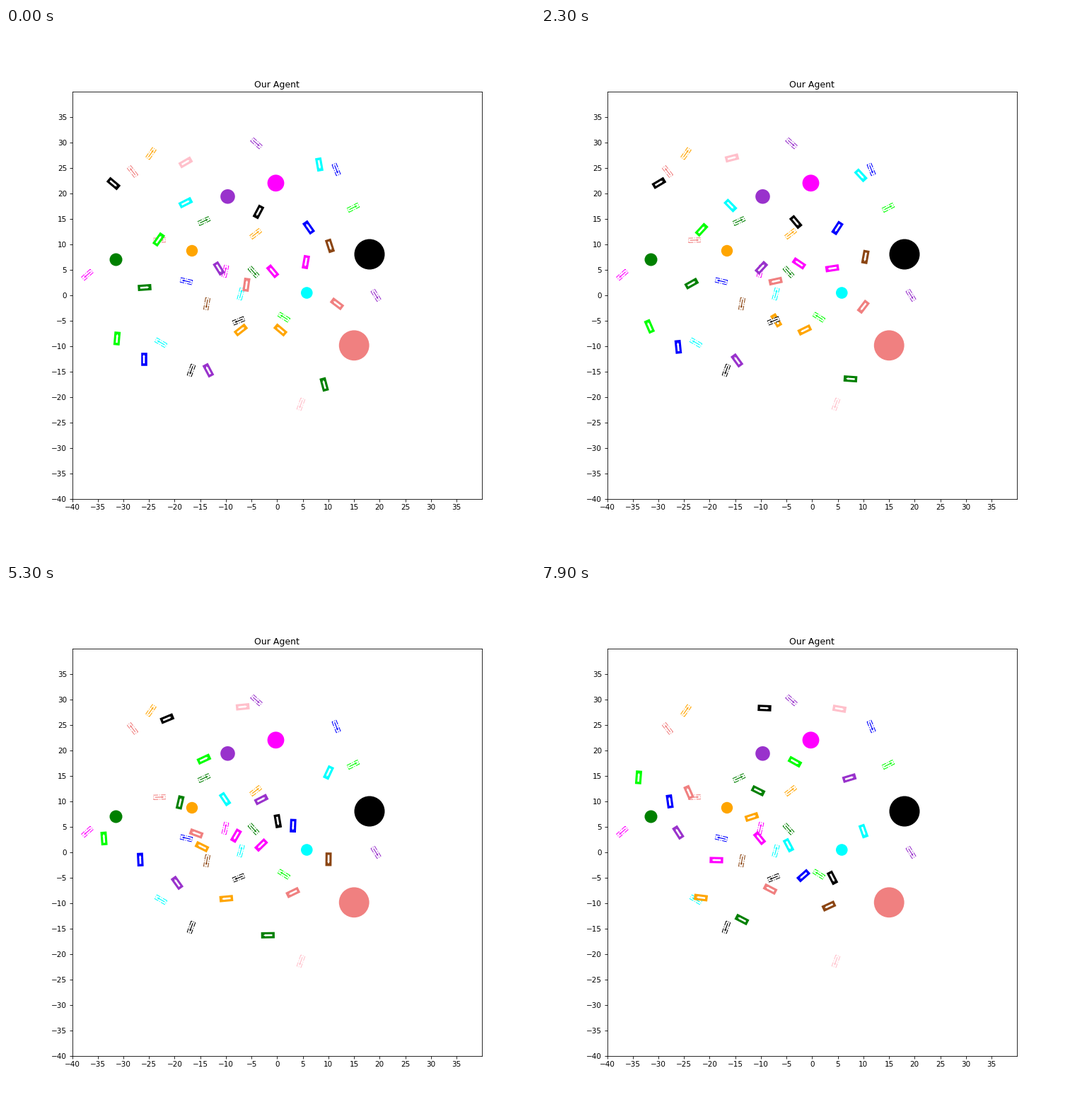
These frames come from a looping animation (748 px wide and 748 px high, 8000 ms). A matplotlib script:

```python
import numpy as np
import matplotlib.pyplot as plt
from matplotlib.animation import FuncAnimation
from matplotlib.patches import Circle, Polygon

SIZE = 748
STEPS = 79
LENGTH, WIDTH = 16.6, 6.2  # vehicle outline in pixels


def travelled(step):
    """Pixels driven since the start; all vehicles share this speed-up."""
    return 0.068 * step ** 1.8


MARKS = travelled(np.array([0, 34, 62, 78]))  # distance at each key point


def arrow_shape(shaft, head):
    return np.array([(-6.2, -shaft), (3, -shaft), (3, -head), (6.4, 0),
                     (3, head), (3, shaft), (-6.2, shaft)])


BODY = np.array([(-1, -1), (1, -1), (1, 1), (-1, 1)]) * (LENGTH / 2, WIDTH / 2)
CAR_ARROW = arrow_shape(1.3, 1.8)
GOAL_ARROW = arrow_shape(0.6, 1.6)

fig, ax = plt.subplots(figsize=(10, 10), dpi=SIZE / 10)
ax.set(xlim=(-40, 40), ylim=(-40, 40), title="Our Agent",
       xticks=np.arange(-40, 40, 5), yticks=np.arange(-40, 40, 5))

# Pixel-sized layer with y pointing down
layer = fig.add_axes([0, 0, 1, 1])
layer.set(xlim=(0, SIZE), ylim=(SIZE, 0))
layer.axis("off")


def place(shape, x, y, angle):
    c, s = np.cos(angle), np.sin(angle)
    px, py = shape.T
    return np.column_stack([x + c * px - s * py, y - s * px - c * py])


def add_poly(shape, **style):
    return layer.add_patch(Polygon(shape, closed=True, **style))


def disc(color, x, y, r):
    layer.add_patch(Circle((x, y), r, fc=color, lw=0, zorder=5))


def goal(color, x, y, deg):
    pose = x, y, np.radians(deg)
    z = 4 if color == "black" else 2
    add_poly(place(BODY, *pose), fc="white", ec=color, lw=1, ls="-.", zorder=z)
    add_poly(place(GOAL_ARROW, *pose), fc=color, lw=0, zorder=z)


class Car:
    """Drives a smooth curve through key points, nose along the curve."""

    def __init__(self, color, deg, *points):
        a = np.radians(deg)
        self.pts = np.array(points, float)
        self.slope = np.gradient(self.pts, MARKS, axis=0, edge_order=2)
        self.slope[0] = np.cos(a), -np.sin(a)
        self.body = add_poly(BODY, fc=color, ec=color, lw=2.5, zorder=3)
        self.arrow = add_poly(CAR_ARROW, fc="white", lw=0, zorder=3)

    def at(self, s):
        i = np.clip(np.searchsorted(MARKS, s) - 1, 0, len(MARKS) - 2)
        span = MARKS[i + 1] - MARKS[i]
        u = (s - MARKS[i]) / span
        w = u * u * (3 - 2 * u)
        return ((1 - w) * self.pts[i] + w * self.pts[i + 1]
                + span * u * (1 - u) * ((1 - u) * self.slope[i]
                                        - u * self.slope[i + 1]))

    def move(self, s):
        x, y = self.at(s)
        dx, dy = self.at(s + 0.2) - self.at(s - 0.2)
        pose = x, y, np.arctan2(-dy, dx)
        self.body.set_xy(place(BODY, *pose))
        self.arrow.set_xy(place(CAR_ARROW, *pose))


disc("green", 155.5, 327.5, 9)
disc("orange", 263, 315, 8.2)
disc("darkorchid", 313.5, 238.3, 10.3)
disc("magenta", 381.5, 219.3, 11.9)
disc("black", 514, 320, 21.5)
disc("lightcoral", 492.2, 448.8, 21.4)
disc("cyan", 425.3, 374.5, 8.3)

goal("pink", 417, 532, 250)
goal("cyan", 332, 376, 75)
goal("cyan", 219, 445, 150)
goal("blue", 467, 200, -68)
goal("blue", 255, 358, 167)
goal("saddlebrown", 284, 390, 260)
goal("magenta", 115, 349, 222)
goal("magenta", 310, 344, 77)
goal("lightcoral", 179, 203, 128)
goal("lightcoral", 217, 300, 2)
goal("orange", 205, 177.5, 55)
goal("orange", 353, 291, 38)
goal("darkorchid", 354, 163, -42)
goal("darkorchid", 523, 378, -58)
goal("lime", 491, 254, 27)
goal("lime", 393, 409, 148)
goal("green", 280, 273, 25)
goal("green", 350, 345, -48)
goal("black", 329, 414, 202)
goal("black", 262, 484, 250)

cars = [
    Car("pink", 30, (254, 190), (290, 179.5), (366, 170.5), (422, 175)),
    Car("cyan", 27, (254, 247), (282, 268), (326, 328), (350, 368)),
    Car("cyan", -80, (443, 193), (465, 225), (447, 294), (456, 348)),
    Car("blue", 125, (428, 282), (411, 300), (401, 370), (371, 411)),
    Car("blue", 90, (195, 468), (192, 431), (188, 359), (182, 306)),
    Car("saddlebrown", -72, (458, 308), (455, 342), (450, 417), (407, 454)),
    Car("magenta", 260, (424, 331), (390, 343), (343, 378), (309, 358)),
    Car("magenta", 130, (377, 344), (350, 327), (305, 378), (248, 389)),
]
cars += [
    Car("lightcoral", 82, (340, 363), (311, 362), (242, 337), (209, 293)),
    Car("lightcoral", 143, (468, 390), (442, 412), (378, 443), (324, 430)),
    Car("orange", 38, (332, 427), (319, 396), (259, 355), (298, 328)),
    Car("orange", 140, (388, 427), (353, 437), (282, 445), (226, 442)),
    Car("darkorchid", -58, (301, 340), (326, 323), (387, 291), (436, 273)),
    Car("darkorchid", 118, (286, 484), (266, 455), (225, 397), (194, 350)),
]
cars += [
    Car("lime", 55, (216, 299), (242, 271), (308, 238), (359, 250)),
    Car("lime", 85, (157, 439), (145, 402), (137, 328), (138, 272)),
    Car("green", 4, (196, 367), (230, 349), (258, 285), (307, 291)),
    Car("green", 105, (450, 504), (415, 496), (339, 493), (284, 473)),
    Car("black", -40, (152, 220), (186, 207), (258, 179), (316, 174)),
    Car("black", -118, (357, 260), (374, 291), (391, 364), (412, 414)),
]


def update(frame):
    s = travelled(max(frame - 1, 0))  # opening pose is held one extra step
    for c in cars:
        c.move(s)


anim = FuncAnimation(fig, update, frames=STEPS + 1, interval=100, repeat=True,
                     repeat_delay=0, init_func=lambda: update(0))
plt.show()
```
